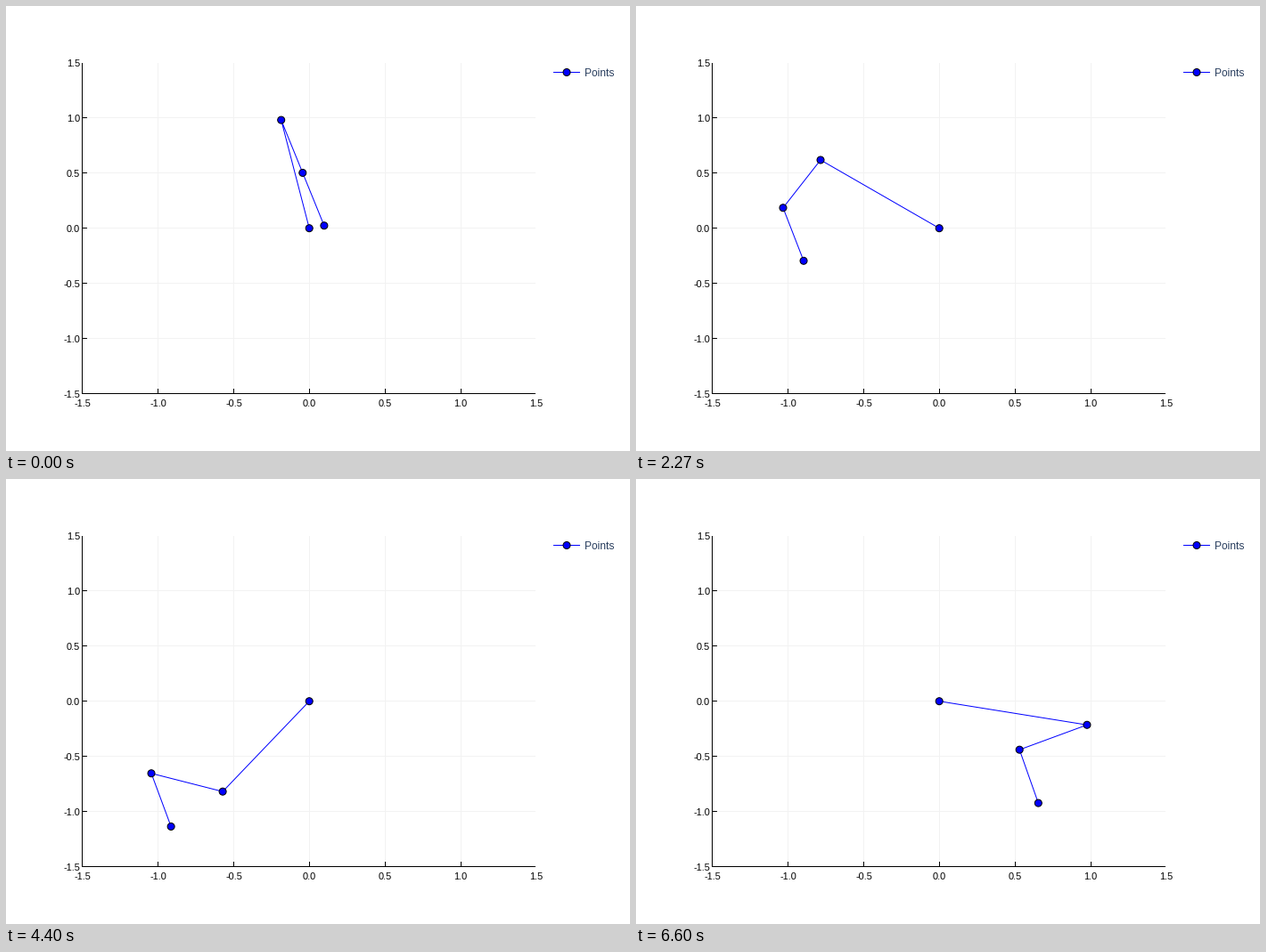
These frames come from a looping animation (700 by 500 pixels, 6670 ms). A matplotlib script:

```python
import matplotlib.pyplot as plt
import numpy as np
from matplotlib.animation import FuncAnimation
from matplotlib.patches import Circle, Rectangle

plt.rcParams["font.family"] = "Liberation Sans"

W, H, DPI = 700, 500, 100
PT = 72 / DPI  # points per pixel
LOOP = 6670
STEPS, SUB = 100, 4  # poses per loop, frames per pose
LEFT, RIGHT, TOP, BOTTOM = 85.8, 594.9, 64, 435.5
ORIGIN = np.array([340.2, 249.7])
SCALE = np.array([169.7, -123.75])
LENGTHS = np.array([1, 0.5, 0.5])
BLUE = "#0000ff"

# Smooth swings of the first two arms through a few key angles
KEYS = [0, 11, 21, 34, 51, 66, 80, 95, 99]
UPPER = [100.7, 109.3, 120.2, 141.7, 184.2, 235.1, 286.1, 335.8, 347.6]
MIDDLE = [-73.5, -78.5, -92.7, -119.7, -165.0, -199.3, -203.4, -167.3, -153.2]
upper, middle = (np.polynomial.Polynomial.fit(KEYS, a, len(KEYS) - 1)
                 for a in (UPPER, MIDDLE))


def joints(step):
    """Pixel positions of the four joints."""
    angles = np.radians([upper(step), middle(step), -73.5 - 0.0212 * step])
    arms = LENGTHS[:, None] * np.column_stack([np.cos(angles), np.sin(angles)])
    points = np.vstack([[0, 0], np.cumsum(arms, axis=0)])
    return ORIGIN + SCALE * points


fig = plt.figure(figsize=(W / DPI, H / DPI), dpi=DPI, facecolor="white")
ax = fig.add_axes([0, 0, 1, 1])
ax.set_xlim(0, W)
ax.set_ylim(H, 0)
ax.axis("off")


def rule(x, y, color="black", z=5):
    ax.plot(x, y, color=color, lw=PT, zorder=z, snap=False,
            solid_capstyle="butt")


def label(x, y, text, size=11, color="black", ha="center"):
    ax.text(x, y, text, size=size * PT, color=color, ha=ha, va="baseline")


def dot(x, y):
    return ax.add_patch(Circle((x, y), 4, fc=BLUE, ec="black", lw=PT, zorder=4))


# Grid, inside ticks and labels, on whole pixels
for k in range(7):
    value = f"{-1.5 + k / 2:.1f}"
    x = LEFT + k * (RIGHT - LEFT) / 6
    y = BOTTOM - k * (BOTTOM - TOP) / 6
    label(x, 450, value)
    label(83, y + 4, value, ha="right")
    if 0 < k < 6:
        gx, gy = int(x) + 0.5, int(y) + 0.5
        rule([gx, gx], [TOP, 435], "#f2f2f2", 1)
        rule([86, 594], [gy, gy], "#f2f2f2", 1)
        rule([gx, gx], [435, 430])
        rule([86, 91], [gy, gy])

# Axes
rule([85.5, 85.5], [TOP, 436])
rule([85, 594], [435.5, 435.5])

# Legend
rule([614, 644], [74.5, 74.5], BLUE, 3)
dot(629, 74.5)
label(649, 79, "Points", 12, "#2a3f5f", "left")

# Linkage, clipped to the plot area
area = Rectangle((LEFT, TOP), RIGHT - LEFT, BOTTOM - TOP, transform=ax.transData)
link, = ax.plot([], [], color=BLUE, lw=PT, zorder=3, snap=False)
dots = [dot(*p) for p in joints(0)]
for part in (link, *dots):
    part.set_clip_path(area)


def update(i):
    # Each pose is held, starting a fraction of a step early
    points = joints(min((i + 1) // SUB, STEPS - 1))
    link.set_data(*points.T)
    for d, p in zip(dots, points):
        d.center = tuple(p)
    return [link, *dots]


anim = FuncAnimation(fig, update, frames=STEPS * SUB,
                     interval=LOOP / (STEPS * SUB), repeat=True, repeat_delay=0)
plt.show()
```
